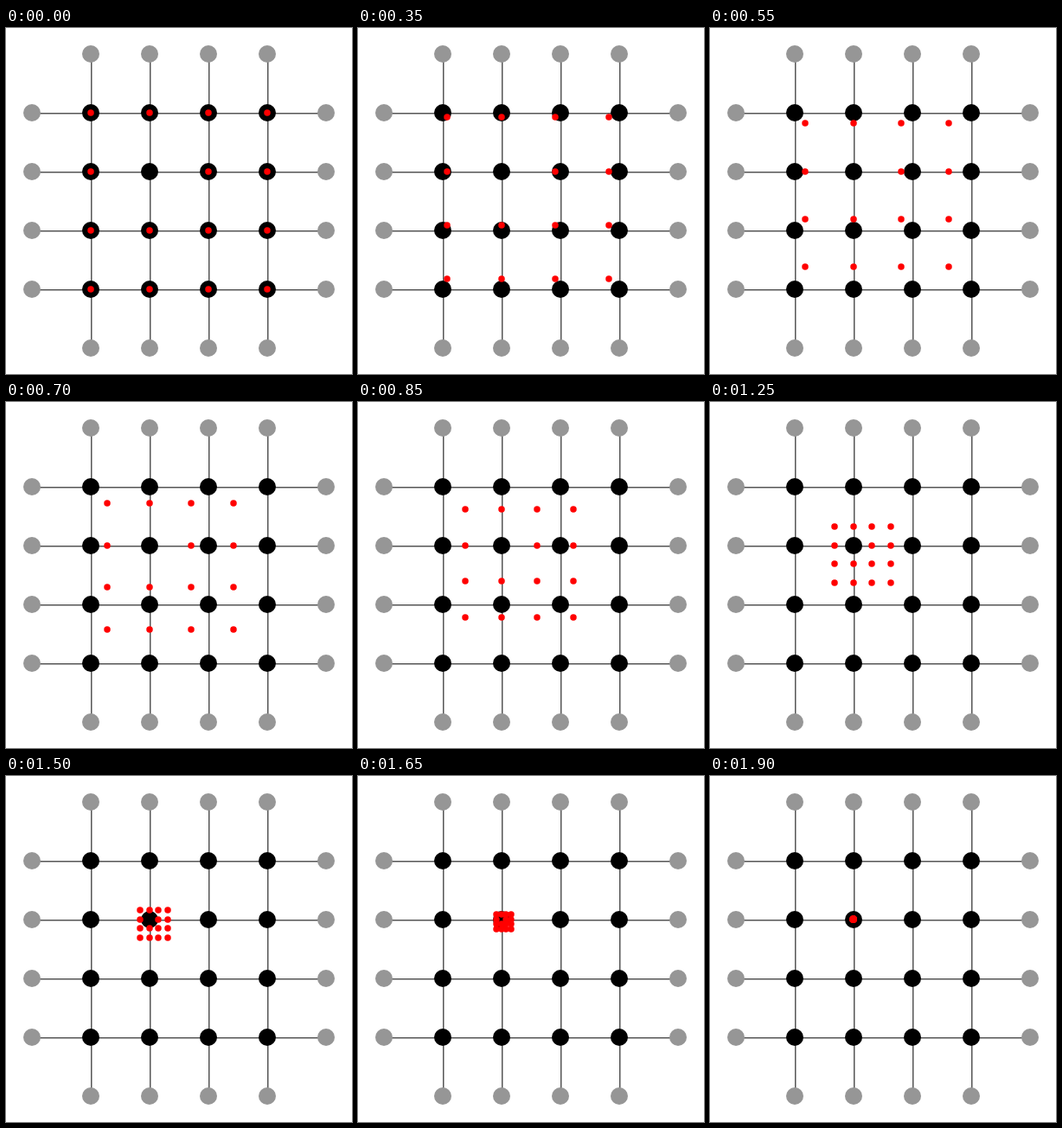
These frames come from a looping animation (400 px wide and 400 px high, 2000 ms). An HTML page with a canvas:

```html
<!DOCTYPE html>
<html lang="en">
<head>
<meta charset="utf-8">
<title>Grid collapse</title>
<style>
html, body { margin: 0; width: 100%; height: 100%; overflow: hidden; background: #fff; }
canvas { display: block; }
</style>
</head>
<body>
<canvas id="stage" width="400" height="400"></canvas>
<script>
const ctx = document.getElementById('stage').getContext('2d');
const LOOP = 2000, STEP = 50;
const GAP = 68, START = 30, END = 370, FOCUS = 166;
const nodes = [1, 2, 3, 4].map(i => START + i * GAP);

function disc(x, y, r, color) {
  ctx.fillStyle = color;
  ctx.beginPath();
  ctx.arc(x, y, r, 0, Math.PI * 2);
  ctx.fill();
}

function drawGrid() {
  ctx.fillStyle = '#fff';
  ctx.fillRect(0, 0, 400, 400);
  ctx.fillStyle = '#555';
  for (const p of nodes) {
    ctx.fillRect(START, p, END - START, 1.5);
    ctx.fillRect(p, START, 1.5, END - START);
  }
  for (const p of nodes) {
    for (const edge of [START, END]) {
      disc(edge, p, 10, '#969696');
      disc(p, edge, 10, '#969696');
    }
    for (const q of nodes) disc(p, q, 10, '#000');
  }
}

function draw(time) {
  // Positions advance in discrete steps and snap to whole pixels.
  const u = Math.floor(time % LOOP / STEP) * STEP / LOOP;
  const ease = u * u * (3 - 2 * u);
  const move = p => Math.floor(p + (FOCUS - p) * ease);
  drawGrid();
  for (const x of nodes) {
    for (const y of nodes) {
      if (x !== FOCUS || y !== FOCUS) disc(move(x), move(y), 3.75, '#f00');
    }
  }
}

const begin = performance.now();
function tick() {
  draw(performance.now() - begin);
  requestAnimationFrame(tick);
}
tick();
</script>
</body>
</html>
```
